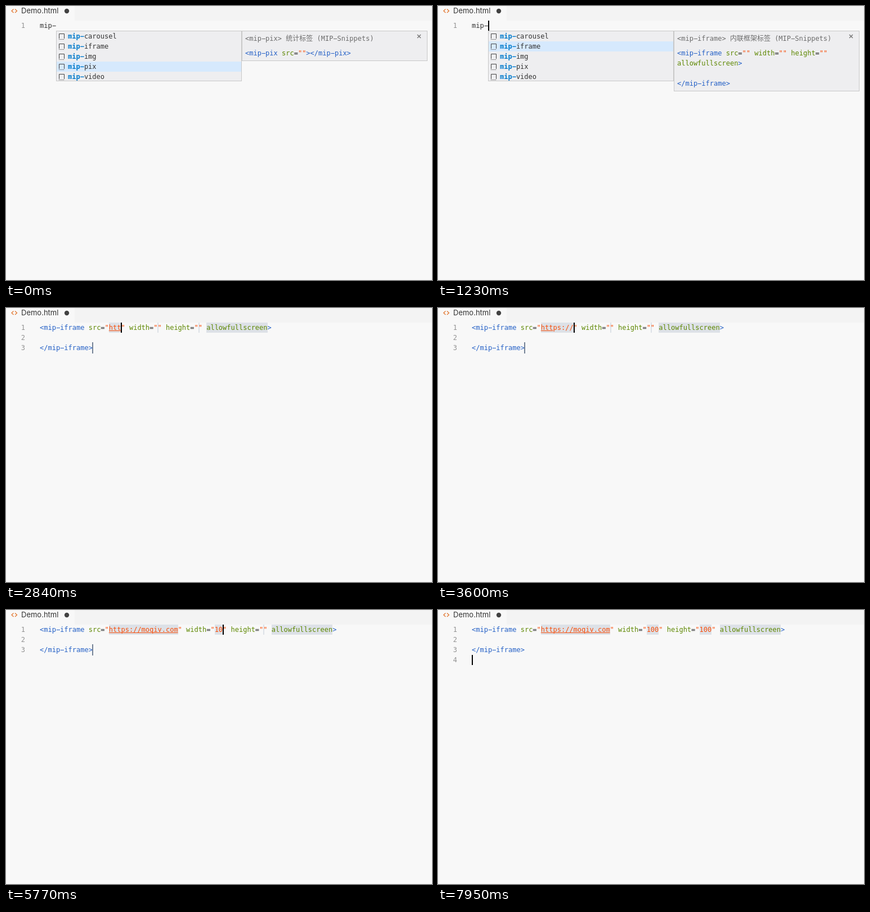
An HTML page with a canvas for the animation above (8 s loop, 757 px wide and 488 px high).

```html
<!DOCTYPE html>
<html lang="zh">
<head>
<meta charset="utf-8">
<title>Demo.html</title>
<style>
  html, body { margin: 0; width: 100%; height: 100%; overflow: hidden; background: #f8f8f8; }
  canvas { display: block; }
</style>
</head>
<body>
<canvas id="stage" width="757" height="488"></canvas>
<script>
const ctx = document.getElementById('stage').getContext('2d');
const LOOP = 8000, CHAR = 7.224, LEFT = 60, ROW = 18;
const MONO = '12px "DejaVu Sans Mono", "Noto Sans CJK SC", "Noto Sans CJK", monospace';
const BLUE = '#2460c6', GREEN = '#5d8700', ORANGE = '#f84e0a', INK = '#333', MARK = '#dde1e7';

// Moments at which each character of a value is typed
const URL_TEXT = 'https://moqiv.com';
const urlKeys = [2070, 2430, 2600, 2920, 3080, 3250, 3490, 3600, 3780,
                 4400, 4550, 4700, 4850, 5000, 5120, 5175, 5230];
const widthKeys = [5610, 5770, 5950];
const heightKeys = [6360, 6520, 6690];
const INSERT = 1650, TO_WIDTH = 5350, TO_HEIGHT = 6060, TO_FLAG = 6830,
      TO_BODY = 7120, TO_END = 7480, ENTER = 7890;
const allKeys = [INSERT, ...urlKeys, TO_WIDTH, ...widthKeys, TO_HEIGHT, ...heightKeys,
                 TO_FLAG, TO_BODY, TO_END, ENTER];

const items = ['carousel', 'iframe', 'img', 'pix', 'video'];
const docs = {
  pix: { title: '<mip-pix> 统计标签 (MIP-Snippets)', code: ['<mip-pix src=""></mip-pix>'] },
  img: { title: '<mip-img> 图片标签 (MIP-Snippets)',
         code: ['<mip-img src="" width="" height=""', 'alt="">', '', '</mip-img>'] },
  iframe: { title: '<mip-iframe> 内联框架标签 (MIP-Snippets)',
            code: ['<mip-iframe src="" width="" height=""', 'allowfullscreen>', '', '</mip-iframe>'] }
};

const typed = (keys, t) => keys.filter(k => k <= t).length;
const colX = col => LEFT + col * CHAR;

function rect(x, y, w, h, color) {
  ctx.fillStyle = color;
  ctx.fillRect(x, y, w, h);
}

// Places every glyph on the monospace grid; returns the end of the text
function text(s, x, y, color, bold = '') {
  ctx.font = bold + MONO;
  ctx.fillStyle = color;
  for (const c of s) {
    ctx.fillText(c === '-' ? '\u2212' : c, x, y);
    x += c > '\u2e80' ? 12 : CHAR;
  }
  return x;
}

function code(line, x, y) {
  for (const part of line.match(/"[^"]*"|<\/?[\w-]+|>|=|\w+|\s+/g) || []) {
    const color = part[0] === '"' ? ORANGE : /[<>]/.test(part) ? BLUE : part === '=' ? INK : GREEN;
    x = text(part, x, y, color);
  }
}

function lineNumber(n) {
  text(String(n), 26.8, 21 + n * ROW, '#929292');
}

function cursor(x, line) {
  rect(Math.round(x), 8 + line * ROW, 2, ROW, '#000');
}

function box(x, y, w, h) {
  rect(x, y, w, h, '#c8c8c8');
  rect(x + 1, y + 1, w - 2, h - 2, '#eeeef0');
}

function path(points, color, width) {
  ctx.strokeStyle = color;
  ctx.lineWidth = width;
  ctx.beginPath();
  points.forEach(([x, y]) => ctx.lineTo(x, y));
  ctx.stroke();
}

function drawTab() {
  rect(0, 0, 757, 488, '#f8f8f8');
  rect(122, 0, 635, 26, '#f3f3f3');
  path([[13.5, 5.5], [10, 8.7], [13.5, 12]], '#e37933', 1.3);
  path([[16, 5.5], [19.5, 8.7], [16, 12]], '#e37933', 1.3);
  ctx.font = '13px Inter, Roboto, sans-serif';
  ctx.fillStyle = INK;
  ctx.fillText('Demo.html', 27, 13);
  ctx.fillStyle = '#424242';
  ctx.beginPath();
  ctx.arc(108, 9, 4.2, 0, 7);
  ctx.fill();
}

function drawSuggestions(t) {
  const chosen = t < 240 ? 'pix' : t < 630 ? 'img' : 'iframe';
  const { title, code: lines } = docs[chosen];

  lineNumber(1);
  text('mip-', LEFT, 39, INK);
  if ((t >= 240 && t < 730) || t >= 1230) cursor(colX(4), 1);

  box(89, 44, 330, 90);
  items.forEach((name, i) => {
    const y = 45 + i * ROW;
    if (name === chosen) rect(90, y, 328, ROW, '#d6e9fd');
    path([[94.5, y + 13], [94.5, y + 4.5], [103.5, y + 4.5], [103.5, y + 13]], '#424242', 1);
    for (let x = 94; x < 104; x += 2) rect(x, y + 14, 1, 1, '#424242');
    const x = text('mip-', 110, y + 13, '#007acc', 'bold ');
    text(name, x, y + 13, INK);
  });

  box(419, 44, 330, 36 + lines.length * ROW);
  text(title, 425, 62, '#6c6c6c');
  path([[731, 51], [737, 57]], '#777', 1.5);
  path([[731, 57], [737, 51]], '#777', 1.5);
  lines.forEach((line, i) => code(line, 425, 88 + i * ROW));
}

function drawEditor(t) {
  const url = URL_TEXT.slice(0, typed(urlKeys, t));
  const w = '100'.slice(0, typed(widthKeys, t));
  const h = '100'.slice(0, typed(heightKeys, t));
  const flag = 'allowfullscreen';

  // Columns where each editable field starts
  const urlCol = 17;
  const wCol = urlCol + url.length + 9;
  const hCol = wCol + w.length + 10;
  const flagCol = hCol + h.length + 2;

  const mark = (col, len, color = MARK) => {
    const x = Math.round(colX(col));
    rect(x, 26, Math.max(2, Math.round(colX(col + len)) - x), ROW, color);
  };
  mark(urlCol, url.length);
  mark(wCol, w.length);
  mark(hCol, h.length);
  mark(flagCol, flag.length, t >= TO_FLAG && t < TO_BODY ? '#c9d0d9' : MARK);

  code(`<mip-iframe src="${url}" width="${w}" height="${h}" ${flag}>`, LEFT, 39);
  code('</mip-iframe>', LEFT, 75);
  for (let n = 1; n <= (t < ENTER ? 3 : 4); n++) lineNumber(n);

  // The link underline lags behind the typing
  const linked = t < 2760 ? 0 : t < 3830 ? 3 : t < 5460 ? 9 : 17;
  rect(colX(urlCol), 40, linked * CHAR, 1, ORANGE);

  if (t < TO_END + 50) rect(153, 61, 2, 20, '#748296');

  const last = Math.max(...allKeys.filter(k => k <= t));
  if ((t - last) % 1000 >= 500) return;
  if (t < TO_WIDTH) cursor(colX(urlCol + url.length), 1);
  else if (t < TO_HEIGHT) cursor(colX(wCol + w.length), 1);
  else if (t < TO_FLAG) cursor(colX(hCol + h.length), 1);
  else if (t < TO_BODY) cursor(colX(flagCol + flag.length), 1);
  else if (t < TO_END) cursor(LEFT, 2);
  else if (t < ENTER) cursor(colX(13), 3);
  else cursor(LEFT, 4);
}

function frame() {
  const t = performance.now() % LOOP;
  drawTab();
  (t < INSERT ? drawSuggestions : drawEditor)(t);
  requestAnimationFrame(frame);
}
frame();
</script>
</body>
</html>
```
